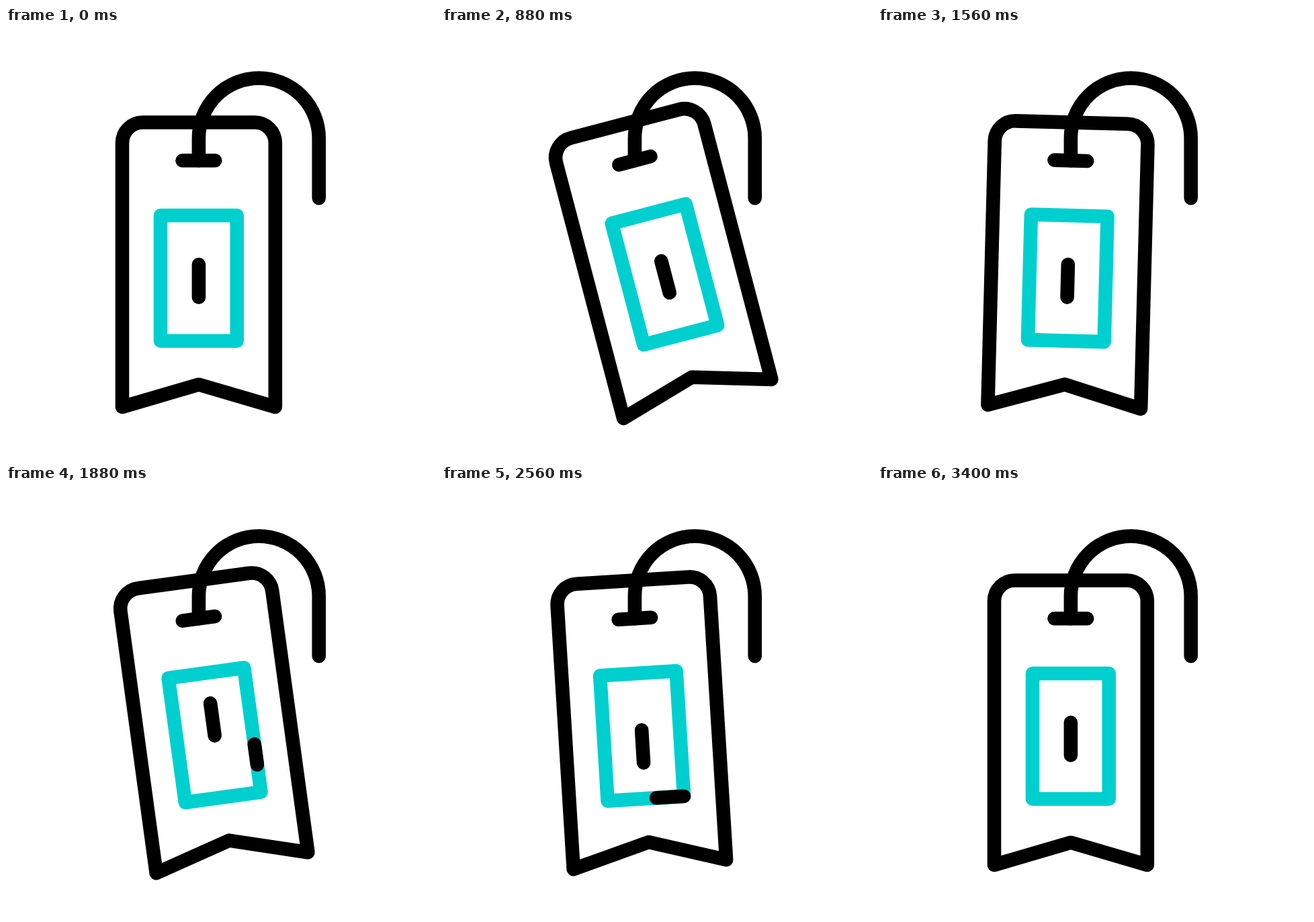
An HTML page with a canvas for the animation above (3520 ms loop, 640 by 640 pixels).

```html
<!DOCTYPE html>
<html lang="en">
<head>
<meta charset="utf-8">
<title>Swinging tag</title>
<style>
  html, body { margin: 0; width: 100%; height: 100%; overflow: hidden; background: #fff; }
  canvas { display: block; width: 640px; height: 640px; }
</style>
</head>
<body>
<canvas id="stage" width="640" height="640"></canvas>
<script>
const ctx = document.getElementById('stage').getContext('2d');
const LOOP = 3520, STEP = 40;
const BLACK = '#000', TEAL = '#00cfcf';
const PIVOT = { x: 287, y: 197.3 };
const PANEL = { left: 230, top: 279, right: 343.7, bottom: 465.7 };
const PERIMETER = 2 * (PANEL.right - PANEL.left + PANEL.bottom - PANEL.top);

// Keys are [time, value, optional ease-out strength].
const SWING = [
  [0, 0], [400, 23], [520, 23, 0.66], [960, -20], [1360, 17], [1760, -14],
  [2120, 10], [2440, -7], [2760, 4], [3080, -1.9], [3400, 0]
];
const DASH_SHIFT = [[1720, 0], [1970, -39], [2470, 16.4], [2720, 0]];
const TRIM_HEAD = [[1720, 0], [2460, 1]];
const TRIM_TAIL = [[1720, 0], [2720, 1]];

// Cubic Bezier easing (out, 0, 2/3, 1), solved by bisection.
function ease(x, out = 1 / 3) {
  let low = 0, high = 1;
  for (let i = 0; i < 24; i++) {
    const s = (low + high) / 2, r = 1 - s;
    if (3 * r * r * s * out + 2 * r * s * s + s * s * s < x) low = s;
    else high = s;
  }
  return low * low * (3 - 2 * low);
}

function valueAt(keys, t) {
  if (t <= keys[0][0]) return keys[0][1];
  for (let i = 1; i < keys.length; i++) {
    const [t0, v0, out] = keys[i - 1], [t1, v1] = keys[i];
    if (t < t1) return v0 + (v1 - v0) * ease((t - t0) / (t1 - t0), out);
  }
  return keys[keys.length - 1][1];
}

function stroke(color, trace) {
  ctx.strokeStyle = color;
  ctx.beginPath();
  trace();
  ctx.stroke();
}

function line(x0, y0, x1, y1) {
  stroke(BLACK, () => { ctx.moveTo(x0, y0); ctx.lineTo(x1, y1); });
}

function tracePanel() {
  const { left, top, right, bottom } = PANEL;
  ctx.moveTo(right, bottom);
  ctx.lineTo(right, top);
  ctx.lineTo(left, top);
  ctx.lineTo(left, bottom);
  ctx.closePath();
}

function traceTag() {
  ctx.moveTo(173, 564);
  ctx.lineTo(173, 171);
  ctx.arcTo(173, 140.5, 203.5, 140.5, 30.5);
  ctx.lineTo(370.3, 140.5);
  ctx.arcTo(400.8, 140.5, 400.8, 171, 30.5);
  ctx.lineTo(400.8, 564);
  ctx.lineTo(286.9, 530.7);
  ctx.closePath();
}

function traceString() {
  ctx.moveTo(286.9, 197.3);
  ctx.lineTo(286.9, 164);
  ctx.arc(376.3, 164, 89.4, Math.PI, 0);
  ctx.lineTo(465.7, 253.3);
}

function draw(t) {
  ctx.fillStyle = '#fff';
  ctx.fillRect(0, 0, 640, 640);
  ctx.lineWidth = 20.6;
  ctx.lineCap = ctx.lineJoin = 'round';

  ctx.save();
  ctx.translate(PIVOT.x, PIVOT.y);
  ctx.rotate(valueAt(SWING, t) * Math.PI / 180);
  ctx.translate(-PIVOT.x, -PIVOT.y);

  stroke(BLACK, traceTag);
  line(262.5, 197.3, 311.2, 197.3);
  stroke(TEAL, tracePanel);

  const tail = valueAt(TRIM_TAIL, t), head = valueAt(TRIM_HEAD, t);
  if (head - tail > 0.0005) {
    ctx.setLineDash([(head - tail) * PERIMETER, PERIMETER * 2]);
    ctx.lineDashOffset = -tail * PERIMETER;
    stroke(BLACK, tracePanel);
    ctx.setLineDash([]);
  }

  const shift = valueAt(DASH_SHIFT, t);
  line(286.9, 352 + shift, 286.9, 400.7 + shift);
  ctx.restore();

  stroke(BLACK, traceString);
}

const start = performance.now();
function tick() {
  const t = (performance.now() - start) % LOOP;
  draw(Math.floor(t / STEP) * STEP);
  requestAnimationFrame(tick);
}
tick();
</script>
</body>
</html>
```
